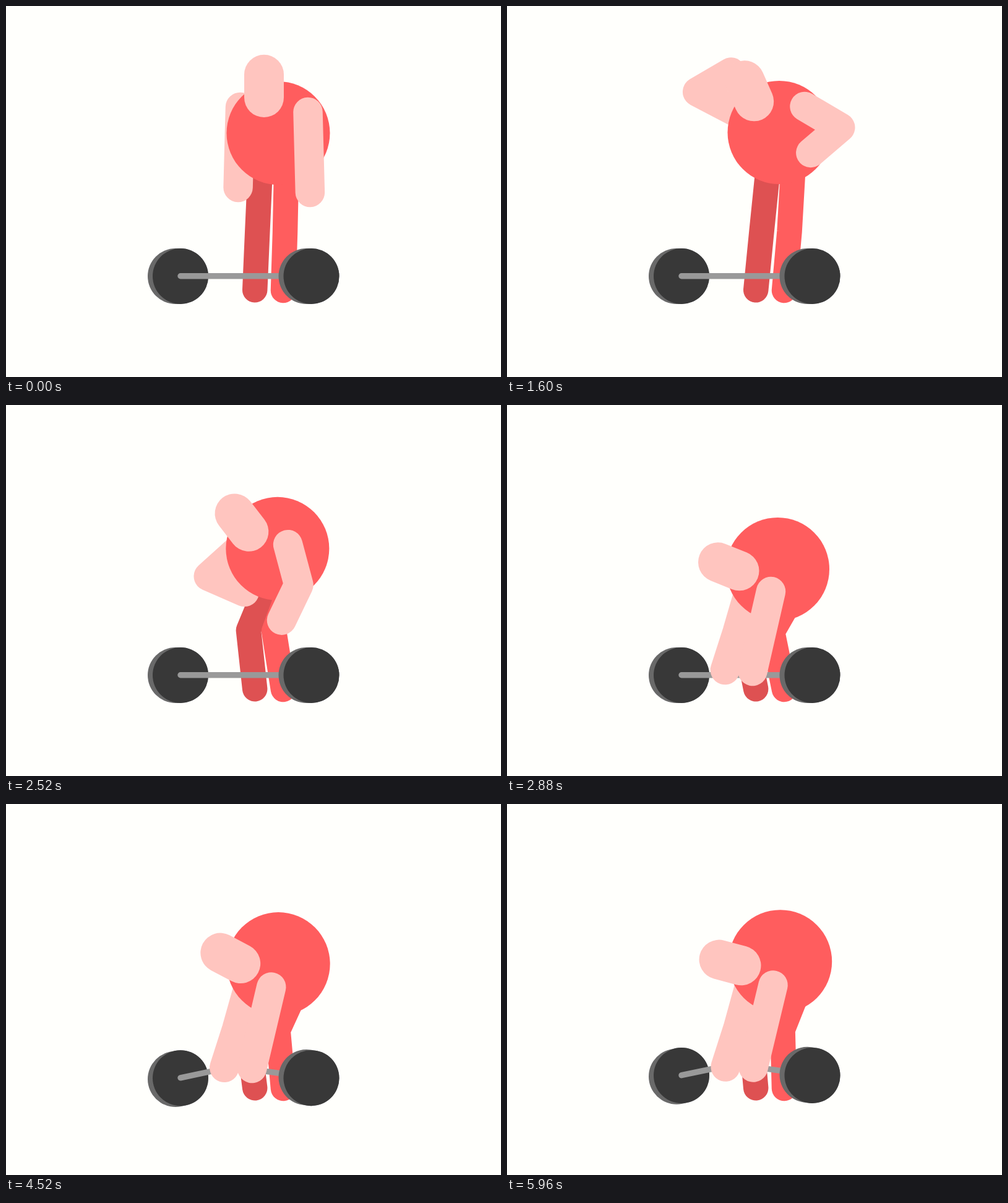
These frames come from a looping animation (800x600 px, 6000 ms). An HTML page:

```html
<!DOCTYPE html>
<html lang="en">
<head>
<meta charset="utf-8">
<title>Weightlifter</title>
<style>
  html, body { margin: 0; width: 100%; height: 100%; overflow: hidden; background: #fffffc; }
  svg { display: block; width: 800px; height: 600px; }
  polyline { fill: none; stroke-linecap: round; stroke-linejoin: round; }
  .leg { stroke-width: 40.5; stroke: #ff5d5e; }
  .leg.back { stroke: #de5152; }
  .arm { stroke-width: 47.5; stroke: #ffc5bf; }
  .head { stroke-width: 64; stroke: #ffc5bf; }
  .rim { stroke-width: 90; stroke: #696969; }
  .bar { stroke-width: 9.4; stroke: #999; }
  .plate { fill: #383838; }
  .torso { fill: #ff5d5e; }
</style>
</head>
<body>
<svg viewBox="0 0 800 600">
  <polyline id="legB" class="leg back"/>
  <polyline id="legF" class="leg"/>
  <polyline id="rimL" class="rim"/>
  <circle id="plateL" class="plate" cx="282" r="45"/>
  <polyline id="bar" class="bar"/>
  <polyline id="rimR" class="rim"/>
  <circle id="plateR" class="plate" cx="493.5" r="45"/>
  <polyline id="armB" class="arm"/>
  <circle id="torso" class="torso" r="83.5"/>
  <polyline id="head" class="head"/>
  <polyline id="armF" class="arm"/>
</svg>
<script>
const LOOP = 6000, GRIP_AT = 2880, HEAVE = 1280;
const $ = id => document.getElementById(id);

// torso: x, y; head: base x, y, tilt; arms: shoulder x, y, upper and lower angle;
// legs: hip x, y, knee x, y; reach: arm length factor
const rest = {
  torso: [440, 205.5], head: [417, 148, 0],
  armF: [488, 171.5, 88.5, 88.5], armB: [378.5, 163.5, 91.5, 91.5],
  legF: [453, 272, 451, 367], legB: [410.5, 272, 406.3, 365], reach: [1]
};
const ready = {
  torso: [440, 204.5], head: [399, 154.5, -24],
  armF: [481, 162.5, 30.5, 139.5], armB: [367, 170, 207.7, -30.3],
  legF: [462, 270, 456.5, 365], legB: [421, 272, 411.5, 365], reach: [1]
};
const dip = {
  torso: [440, 204.5], head: [406, 152.7, -12.3],
  armF: [480, 162, 51.7, 126.4], armB: [366, 173, 164.6, -47.3],
  legF: [456.5, 272, 436.5, 365], legB: [425, 272, 398.5, 362], reach: [1]
};
const grip = {
  torso: [437.5, 265.5], head: [376, 267, -68],
  armF: [426.5, 301.5, 102.9, 102.9], armB: [391, 302, 106.2, 107.8],
  legF: [476.5, 284, 429, 367], legB: [431, 284, 384, 367], reach: [1.018]
};
const pull = {
  torso: [441.7, 254.7], head: [378, 262, -75],
  armF: [430, 293, 103.5, 103.5], armB: [392, 294, 105.4, 107.7],
  legF: [480.5, 277, 445.5, 365], legB: [434, 277, 394, 365], reach: [1.052]
};
const lookUp = y => ({ ...ready, head: [421, y, 0] });

const standing = [
  [0, rest], [400, lookUp(132)], [640, lookUp(139)], [960, ready], [1300, lookUp(139)],
  [1620, ready], [1920, lookUp(143)], [2200, dip], [GRIP_AT, grip]
];

// One heave: time within the heave, value
const lift = [[0, 0], [360, .64], [520, 1], [680, 1.27], [920, .91], [HEAVE, 0]];
const tilt = [[0, -68], [360, -62], [520, -75], [920, -83], [HEAVE, -68]];
const bend = [[0, 0], [320, .2], [520, .21], [920, .053], [HEAVE, 0]];
const sink = [[0, 0], [160, 3], [320, 7.3], [360, 6.2], [520, 2], [920, -1], [HEAVE, 0]];

const ease = t => (1 - Math.cos(Math.PI * t)) / 2;

function mix(a, b, t) {
  const pose = {};
  for (const part in a) pose[part] = a[part].map((v, i) => v + (b[part][i] - v) * t);
  return pose;
}

function segment(keys, t) {
  let i = 0;
  while (i < keys.length - 2 && t >= keys[i + 1][0]) i++;
  return i;
}

// Smooth curve through the keys, level at both ends
function curve(keys, t) {
  const i = segment(keys, t), [t0, a] = keys[i], [t1, b] = keys[i + 1];
  const slope = k => k > 0 && k < keys.length - 1
    ? (keys[k + 1][1] - keys[k - 1][1]) / (keys[k + 1][0] - keys[k - 1][0]) : 0;
  const d = t1 - t0, u = (t - t0) / d, v = 1 - u;
  return v * v * ((1 + 2 * u) * a + u * d * slope(i)) + u * u * ((3 - 2 * u) * b - v * d * slope(i + 1));
}

function poseAt(t) {
  if (t < GRIP_AT) {
    const i = segment(standing, t), [t0, a] = standing[i], [t1, b] = standing[i + 1];
    return mix(a, b, ease((t - t0) / (t1 - t0)));
  }
  const phase = (t - GRIP_AT) % HEAVE;
  const pose = mix(grip, pull, curve(lift, phase));
  const angle = curve(tilt, phase), drop = -62 - angle;
  pose.head = [pose.torso[0] - 61 - .17 * drop, pose.torso[1] - .5 + .54 * drop, angle];
  return pose;
}

const line = (id, ...points) => $(id).setAttribute('points', points.map(p => p.map(v => v.toFixed(2))).join(' '));

function step([x, y], degrees, length) {
  const a = degrees * Math.PI / 180;
  return [x + Math.cos(a) * length, y + Math.sin(a) * length];
}

function drawArm(id, [x, y, upper, lower], reach) {
  const elbow = step([x, y], upper, 67 * reach);
  line(id, [x, y], elbow, step(elbow, lower, 63 * reach));
}

function drawBarbell(t) {
  const phase = t < GRIP_AT ? 0 : (t - GRIP_AT) % HEAVE;
  const y = 437 + curve(sink, phase), left = curve(bend, phase), right = left * .68;
  line('rimL', [274, y + 8 * left], [282, y]);
  line('rimR', [485.5, y - 8 * right], [493.5, y]);
  line('bar', [282, y - .3], [353, y - .3 - 71 * left], [398, y - .3 - 95.5 * right], [493.5, y - .3]);
  $('plateL').setAttribute('cy', y);
  $('plateR').setAttribute('cy', y);
}

function draw(t) {
  const { torso, head, armF, armB, legF, legB, reach } = poseAt(t);
  $('torso').setAttribute('cx', torso[0]);
  $('torso').setAttribute('cy', torso[1]);
  line('head', head.slice(0, 2), step(head, head[2] - 90, 37.2));
  drawArm('armF', armF, reach[0]);
  drawArm('armB', armB, reach[0]);
  line('legF', legF.slice(0, 2), legF.slice(2), [448, 460]);
  line('legB', legB.slice(0, 2), legB.slice(2), [402.2, 459.3]);
  drawBarbell(t);
}

const start = performance.now();
function tick() {
  draw((performance.now() - start) % LOOP);
  requestAnimationFrame(tick);
}
tick();
</script>
</body>
</html>
```
